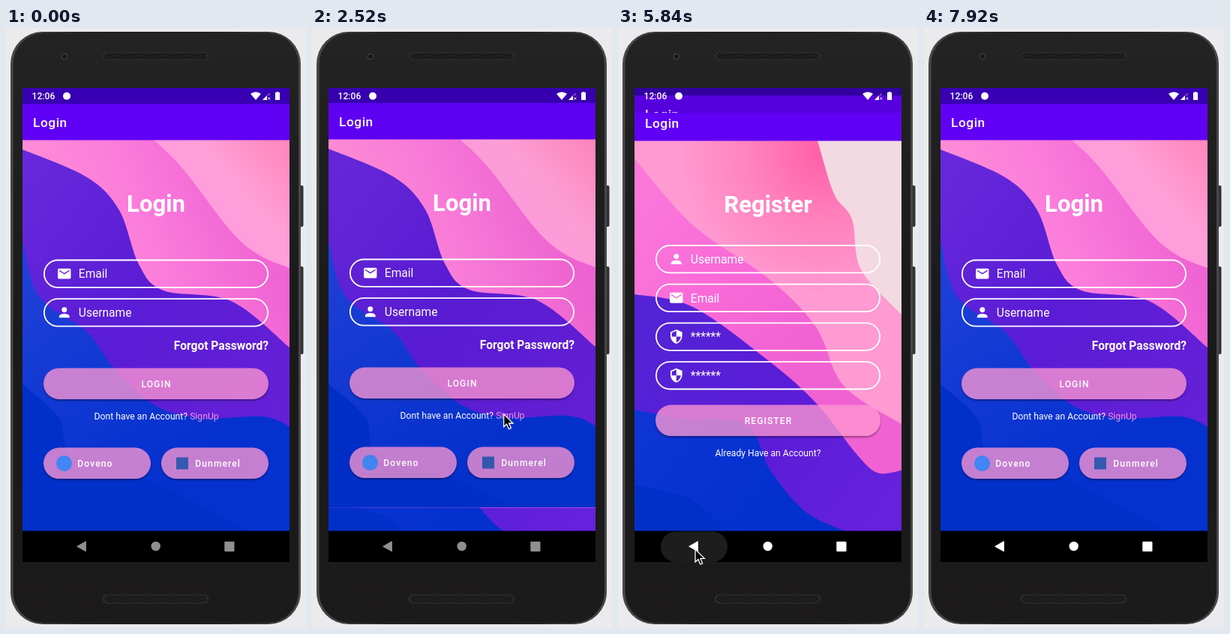
An HTML page for the animation above (7.96 s loop, 400 by 800 pixels).

```html
<!DOCTYPE html>
<html lang="en">
<head>
<meta charset="utf-8">
<title>Login and register</title>
<style>
  html, body { margin: 0; width: 100%; height: 100%; overflow: hidden; background: #ebebed; }
  svg { display: block; width: 100vw; height: 100vh; }
  text { font-family: Roboto, "Noto Sans", sans-serif; fill: #fff; white-space: pre; }
</style>
</head>
<body>
<svg id="stage" viewBox="0 0 400 800"></svg>
<script>
const LOOP = 7960, STEP = 40;
const OPEN_AT = 2440, CLOSE_AT = 5782, SLIDE = 425;
const PRESS_AT = 5680, RELEASE_AT = 5840;
const WINDOW = 632, ROW = 51.7;

// Stops of the pointer tip: time, x, y
const POINTER = [
  [920, 236, 804], [2100, 255, 514], [3300, 257, 516], [4080, 164, 704],
  [5300, 103, 695], [5900, 103, 695], [6480, 184, 759], [6700, 192, 804]
];

const ICONS = {
  mail: 'M20 4H4c-1.1 0-2 .9-2 2v12c0 1.1.9 2 2 2h16c1.1 0 2-.9 2-2V6c0-1.1-.9-2-2-2zm0 4l-8 5-8-5V6l8 5 8-5z',
  person: 'M12 12a4 4 0 1 0 0-8 4 4 0 0 0 0 8zm0 2c-2.7 0-8 1.3-8 4v2h16v-2c0-2.7-5.3-4-8-4z',
  shield: 'M12 1L3 5v6c0 5.5 3.8 10.7 9 12 5.2-1.3 9-6.5 9-12V5zm0 11h7c-.5 4.1-3.3 7.8-7 8.9V12H5V6.3l7-3.1z'
};

const rect = (x, y, w, h, fill, r = 0, more = '') =>
  `<rect x="${x}" y="${y}" width="${w}" height="${h}" rx="${r}" fill="${fill}" ${more}/>`;

const text = (x, y, str, size, weight = 400, more = '') =>
  `<text x="${x}" y="${y}" font-size="${size}" font-weight="${weight}" ${more}>${str}</text>`;

const stops = colors =>
  colors.map((c, i) => `<stop offset="${i / (colors.length - 1)}" stop-color="${c}"/>`).join('');

const linear = (id, [x1, y1], [x2, y2], ...colors) =>
  `<linearGradient id="${id}" gradientUnits="userSpaceOnUse" x1="${x1}" y1="${y1}" x2="${x2}" y2="${y2}">` +
  stops(colors) + '</linearGradient>';

const radial = (id, [x, y], r, ...colors) =>
  `<radialGradient id="${id}" gradientUnits="userSpaceOnUse" cx="${x}" cy="${y}" r="${r}">` +
  stops(colors) + '</radialGradient>';

// Smooth curve through a few points, closed around the lower left
function wave(fill, ...points) {
  const at = i => points[Math.max(0, Math.min(points.length - 1, i))];
  let d = `M${points[0]}`;
  for (let i = 0; i < points.length - 1; i++) {
    const [a, b, c, e] = [at(i - 1), at(i), at(i + 1), at(i + 2)];
    d += `C${b[0] + (c[0] - a[0]) / 6} ${b[1] + (c[1] - a[1]) / 6} ` +
         `${c[0] - (e[0] - b[0]) / 6} ${c[1] - (e[1] - b[1]) / 6} ${c}`;
  }
  return `<path d="${d}V715H22V${points[0][1]}Z" fill="${fill}"/>`;
}

const field = (y, icon, label) =>
  rect(50.9, y - 18.1, 298.2, 36.4, 'none', 18.2, 'stroke="#fff" stroke-width="1.8"') +
  `<path transform="translate(67.4 ${y - 10.4}) scale(.865)" d="${ICONS[icon]}" fill="#fff"/>` +
  text(96.8, y + 5.8, label, 15.57);

const form = (top, ...rows) =>
  rows.map(([icon, label], i) => field(top + i * ROW, icon, label)).join('');

const button = (x, y, w) =>
  rect(x, y, w, 41.4, '#000', 20.7, 'opacity=".35" filter="url(#shade)"') +
  rect(x, y, w, 41.4, '#ff98d2', 20.7, 'fill-opacity=".77"');

const caption = (x, y, str, anchor = 'start') =>
  text(x, y, str, 12.1, 500, `letter-spacing="1.08" text-anchor="${anchor}"`);

const bars = rect(22, 80, 356, 22, '#3800b2') + rect(22, 101, 356, 48.5, '#6000f5') +
  text(36, 132, 'Login', 17.3, 500, 'letter-spacing=".55"');

const heading = str => text(200, 245, str, 31.1, 700, 'text-anchor="middle"');

const loginScreen =
  rect(22, 140, 356, 575, 'url(#blush)') +
  wave('url(#orchid)', [197, 149], [236, 188], [300, 271], [338, 303], [378, 320]) +
  wave('url(#violet)', [22, 162], [108, 199], [151, 243], [177, 315], [210, 350], [300, 364], [378, 426]) +
  wave('url(#azure)', [22, 283], [44, 358], [108, 405], [145, 455], [200, 504], [260, 520], [342, 518], [378, 531]) +
  wave('#002fca', [22, 475], [71, 520], [90, 570], [200, 607], [330, 675]) +
  bars + heading('Login') +
  form(327.6, ['mail', 'Email'], ['person', 'Username']) +
  text(350, 428.8, 'Forgot Password?', 15.57, 700, 'text-anchor="end"') +
  button(50, 453.5, 300) + caption(200.5, 478.8, 'LOGIN', 'middle') +
  text(117.6, 522, 'Dont have an Account? <tspan fill="#ef92e4">SignUp</tspan>', 12.2) +
  button(50, 559.6, 143) + button(207, 559.6, 143) +
  '<circle cx="77.5" cy="580.5" r="10.5" fill="#4285f4"/>' +
  rect(227, 572.5, 16, 16, '#3459b0') +
  caption(95.3, 585, 'Doveno') + caption(252.3, 585, 'Dunmerel');

const registerScreen =
  rect(22, 140, 356, 575, '#f2d9e2') +
  wave('url(#rose)', [266, 149], [288, 220], [312, 254], [324, 321], [378, 381]) +
  wave('url(#fuchsia)', [22, 173], [100, 262], [202, 334], [264, 398], [301, 476], [378, 527]) +
  wave('url(#violetLow)', [22, 354], [100, 371], [200, 442], [265, 500], [318, 567], [346, 592], [378, 589]) +
  wave('url(#azureLow)', [22, 508], [90, 520], [170, 527], [204, 590], [250, 644], [305, 671]) +
  wave('#002fca', [22, 608], [100, 629], [143, 672]) +
  bars + heading('Register') +
  form(307.1, ['person', 'Username'], ['mail', 'Email'], ['shield', '******'], ['shield', '******']) +
  button(50, 501.6, 300) + caption(200.5, 526.8, 'REGISTER', 'middle') +
  text(200, 570, 'Already Have an Account?', 12.15, 400, 'text-anchor="middle"');

const defs = '<defs>' +
  linear('blush', [240, 270], [378, 150], '#ff9be0', '#ff9fd8', '#ff86ba') +
  linear('orchid', [60, 310], [310, 210], '#ff8fd6', '#fb7cdb', '#f064d3') +
  linear('violet', [22, 200], [378, 480], '#6628da', '#5a1cd5', '#6420d6') +
  linear('azure', [22, 320], [190, 600], '#1f40d8', '#0531cf') +
  radial('rose', [272, 165], 190, '#ff5fa8', '#ff82bd', '#ff9ad2') +
  linear('fuchsia', [22, 230], [260, 420], '#fb78da', '#f96ad8', '#f062d2') +
  linear('violetLow', [22, 380], [378, 640], '#5424d6', '#5a1cd6', '#6622dc') +
  linear('azureLow', [22, 520], [180, 660], '#0f35d6', '#0330ce') +
  linear('shell', [6, 0], [393, 0], '#48484b', '#232324', '#1f1f20', '#232324', '#48484b') +
  linear('face', [0, 8], [0, 793], '#232324', '#1a1a1b', '#1c1a1b') +
  '<filter id="shade" x="-10%" y="-30%" width="120%" height="170%">' +
  '<feGaussianBlur stdDeviation="1.3"/><feOffset dy="1.8"/>' +
  '<feComposite operator="out" in2="SourceGraphic"/></filter>' +
  '<pattern id="mesh" width="4" height="4" patternUnits="userSpaceOnUse">' +
  '<circle cx="1" cy="1" r=".9"/><circle cx="3" cy="3" r=".9"/></pattern>' +
  '<clipPath id="screen"><rect x="22" y="80" width="356" height="632"/></clipPath>' +
  '<clipPath id="reveal"><rect id="revealBox" x="22" y="80" width="356" height="632"/></clipPath>' +
  '</defs>';

const grille = (y, h) => rect(128.5, y, 142, h, '#2b2b2c', h / 2) +
  rect(131, y + 1.5, 137, h - 3, 'url(#mesh)', h / 2 - 1.5);

const phone =
  rect(389, 210, 7.5, 55, '#333335', 2) + rect(389, 318, 7.5, 117, '#333335', 2) +
  rect(6, 5, 387, 790, 'url(#shell)', 43) + rect(9.5, 7, 380.5, 786, 'url(#face)', 41) +
  grille(32, 11) + grille(755, 12.5) +
  '<circle cx="78" cy="38" r="4.8" fill="#343436"/><circle cx="78" cy="38" r="2.6" fill="#151519"/>';

const status = text(34.6, 95.2, '12:06', 12.1, 500) +
  '<g fill="#fff"><circle cx="81" cy="90.7" r="5"/>' +
  '<path d="M326 87.8Q333 82.6 340 87.8L333 96Z"/>' +
  '<path d="M342 96L351.5 86.2V90H348V96Z" fill-opacity=".35"/><path d="M342 96L348 90V96Z"/>' +
  '<path d="M349.4 92.4l2.8 3.2m0-3.2l-2.8 3.2" stroke="#fff" stroke-width=".9"/>' +
  '<path d="M360.6 86V85H363.4V86H365V96H359V86Z"/></g>';

const nav = rect(22, 670.5, 356, 41.5, '#000') +
  rect(57, 671.5, 89, 40.5, '#1d1d1d', 20, 'id="ripple"') +
  '<g id="keys"><path d="M95 691.2L106.3 684.8V697.6Z" stroke-width="1.2" stroke-linejoin="round"/>' +
  '<circle cx="199.7" cy="691" r="6.2"/><rect x="291.3" y="684.7" width="13.2" height="13.2" rx="1"/></g>';

const stage = document.getElementById('stage');
stage.innerHTML = defs + rect(0, 0, 400, 800, '#ebebed') + phone +
  '<g clip-path="url(#screen)">' + rect(22, 80, 356, 632, '#000') +
  `<g id="login">${loginScreen}</g>` +
  `<g id="register"><g clip-path="url(#reveal)">${registerScreen}</g></g>` +
  status + nav + '</g>' +
  '<path id="pointer" d="M0 0V17L3.9 13.4L6.7 20L9.7 18.8L6.9 12.3H12.3Z" fill="#000" stroke="#fff" stroke-width="1.3"/>';

const [login, register, revealBox, ripple, keys, pointer] =
  ['login', 'register', 'revealBox', 'ripple', 'keys', 'pointer'].map(id => document.getElementById(id));

const clamp = v => Math.max(0, Math.min(1, v));

// cubic-bezier(.4, 0, .2, 1)
function ease(x) {
  if (x <= 0 || x >= 1) return clamp(x);
  let lo = 0, hi = 1;
  for (let i = 0; i < 24; i++) {
    const u = (lo + hi) / 2, v = 1 - u;
    if (1.2 * u * v * v + .6 * u * u * v + u * u * u < x) lo = u; else hi = u;
  }
  return lo * lo * (3 - 2 * lo);
}

function pointerAt(t) {
  const i = POINTER.findIndex(k => k[0] > t);
  if (i < 1) return null;
  const [a, b] = [POINTER[i - 1], POINTER[i]];
  const p = (t - a[0]) / (b[0] - a[0]);
  return [a[1] + (b[1] - a[1]) * p, a[2] + (b[2] - a[2]) * p];
}

function draw(t) {
  const cover = ease((t - OPEN_AT) / SLIDE) - ease((t - CLOSE_AT) / SLIDE);
  const hidden = 1 - cover;
  login.setAttribute('transform', `translate(0 ${Math.round(-.019 * WINDOW * cover)})`);
  login.setAttribute('opacity', 1 - .1 * cover);
  register.setAttribute('transform', `translate(0 ${Math.round(.041 * WINDOW * hidden)})`);
  register.setAttribute('display', cover > 0 ? 'inline' : 'none');
  revealBox.setAttribute('y', 80 + .959 * WINDOW * hidden);

  const glow = clamp((t - PRESS_AT) / 80) * (1 - clamp((t - RELEASE_AT) / 240));
  ripple.setAttribute('opacity', glow);
  const tint = t < PRESS_AT ? '#8f8f8f' : '#fff';
  keys.setAttribute('fill', tint);
  keys.firstChild.setAttribute('stroke', tint);

  const tip = pointerAt(t);
  pointer.setAttribute('display', tip ? 'inline' : 'none');
  if (tip) pointer.setAttribute('transform', `translate(${tip})`);
}

const start = performance.now();
function tick() {
  const t = (performance.now() - start) % LOOP;
  draw(Math.floor(t / STEP) * STEP);
  requestAnimationFrame(tick);
}
tick();
</script>
</body>
</html>
```
